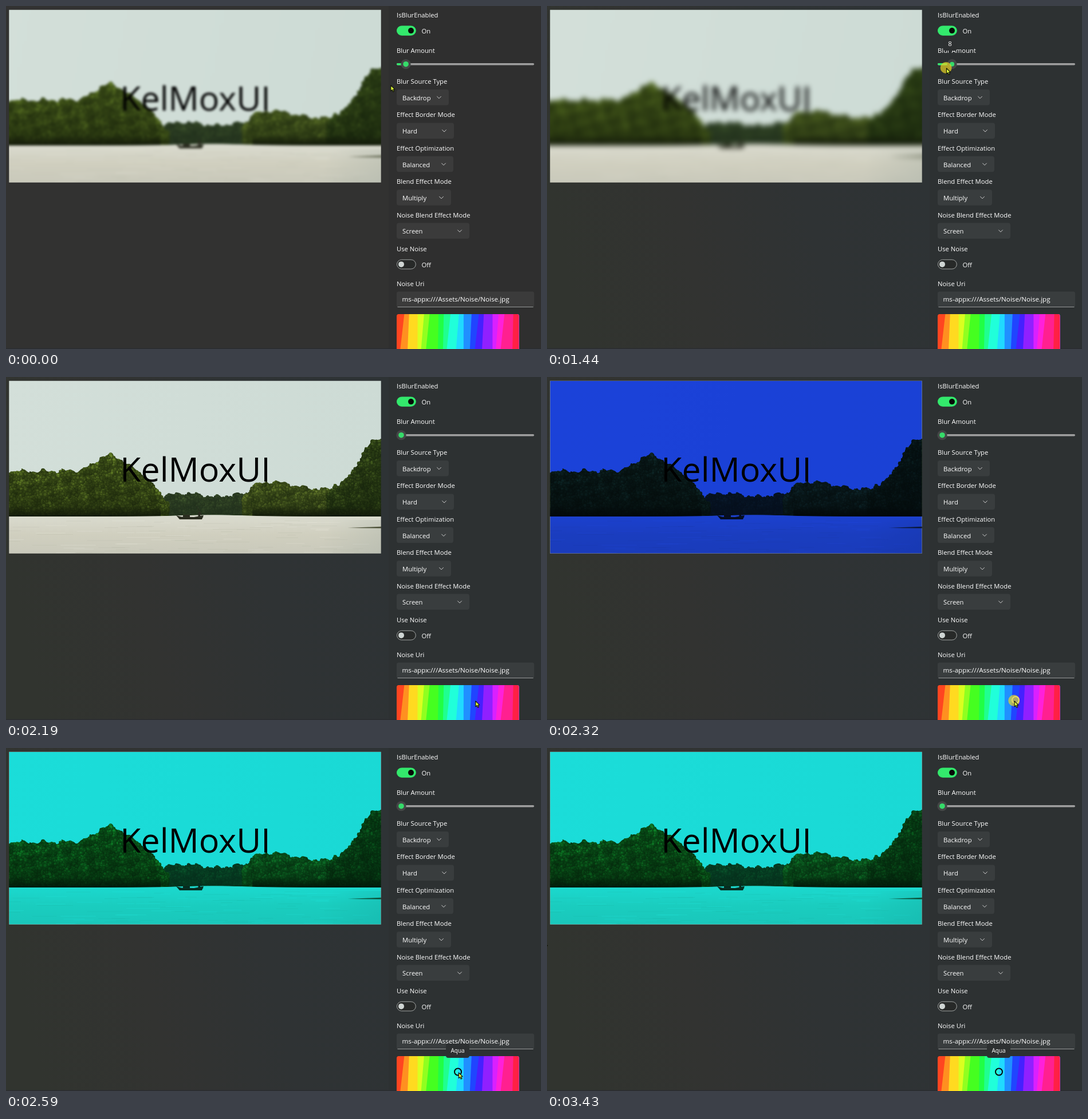
An HTML page with a canvas for the animation above (3.56 s loop, 934x600 px).

```html
<!DOCTYPE html>
<html lang="en">
<head>
<meta charset="utf-8">
<title>Blur settings</title>
<style>
html, body { margin: 0; width: 100%; height: 100%; overflow: hidden; background: #323231; }
canvas { display: block; }
</style>
</head>
<body>
<canvas id="stage" width="934" height="600"></canvas>
<script>
const ctx = document.getElementById('stage').getContext('2d');
const FONT = '"Open Sans", "Noto Sans", sans-serif';
const ACCENT = '#33e96c';
const LOOP = 3560, TICK = LOOP / 52;
const PAD = 40;
const LEFT = 682;
const PHOTO = [5.3, 6.7, 649.4, 302];
const PICKER = { x: LEFT, y: 539, w: 213.5, h: 70 };
const DRAG = { from: 885, to: 1580 };
const PICK = { from: 2320, to: 2590 };

const clamp = v => Math.max(0, Math.min(1, v));
const ramp = (t, a, b) => clamp((t - a) / (b - a));
const smooth = v => v * v * (3 - 2 * v);
const lerp = (a, b, k) => a + (b - a) * k;
const bump = (x, center, width) => Math.exp(-(((x - center) / width) ** 2));
const between = (t, a, b) => t >= a && t < b;
const snap = t => Math.floor((t + 12) / TICK) * TICK;

function randomizer(seed) {
  return () => {
    seed = (seed * 1664525 + 1013904223) >>> 0;
    return seed / 4294967296;
  };
}

function disc(x, y, r, fill, c = ctx) {
  c.fillStyle = fill;
  c.beginPath();
  c.arc(x, y, r, 0, Math.PI * 2);
  c.fill();
}

function fillRound(x, y, w, h, r, fill) {
  ctx.fillStyle = fill;
  ctx.beginPath();
  ctx.roundRect(x, y, w, h, r);
  ctx.fill();
}

function gradient(c, x0, y0, x1, y1, colors) {
  const g = c.createLinearGradient(x0, y0, x1, y1);
  colors.forEach((color, i) => g.addColorStop(i / (colors.length - 1), color));
  return g;
}

function polygon(...points) {
  const p = new Path2D();
  for (let i = 0; i < points.length; i += 2) p.lineTo(points[i], points[i + 1]);
  p.closePath();
  return p;
}

function label(str, x, y, size = 11.25, align = 'left') {
  ctx.font = `${size}px ${FONT}`;
  ctx.textAlign = align;
  ctx.fillStyle = '#fff';
  ctx.fillText(str, x, y);
}

// ---- Motion ----

function amountAt(t) {
  const p = ramp(t, DRAG.from, DRAG.to);
  return 3.6 * (1 - p) + 11.5 * Math.sin(Math.PI * p);
}

const thumbX = t => 690 + amountAt(t) * 2.24;

function glide(t, t0, t1, x0, y0, x1, y1) {
  const k = ramp(t, t0, t1);
  return [lerp(x0, x1, k), lerp(y0, y1, k)];
}

function pointer(t) {
  if (t < 330) return glide(t, 0, 130, 671, 138, 685, 124);
  if (t < DRAG.from) return glide(t, 330, 820, 685, 124, 695, 107.5);
  if (t < 1650) return [thumbX(t + 90) , 108];
  if (t < 1920) return glide(t, 1650, 1920, 690, 108, 776, 481);
  if (t < PICK.from) return glide(t, 1920, 2190, 776, 481, 819, 566);
  if (t < 2650) return glide(t, PICK.from, PICK.to, 816, 566, 789.5, 567);
  return glide(t, 2650, 3430, 789, 567, -14, 336);
}

// ---- Landscape ----

const shoreY = x => 244 - 2.5 * bump(x, 360, 80);

const GROVES = [
  { from: 258, to: 440, count: 900, dark: [32, 46, 28], light: [66, 90, 46],
    top: x => 204 + 3 * Math.sin(x / 18) },
  { from: -40, to: 283, count: 3000, dark: [27, 38, 12], light: [104, 132, 40],
    top: x => 162 - 28 * bump(x, 181, 33) + 65 * ramp(x, 225, 290) ** 1.3 },
  { from: 414, to: 620, count: 1900, dark: [31, 43, 15], light: [108, 132, 46],
    top: x => 194 - 13 * bump(x, 468, 45) + 18 * ramp(x, 430, 414) },
  { from: 562, to: 700, count: 2000, dark: [21, 34, 12], light: [76, 102, 34],
    top: x => 185 - 80 * smooth(ramp(x, 580, 650)) + 18 * ramp(x, 574, 562) }
];

function drawGrove(c, rnd, { from, to, count, dark, light, top }) {
  const shade = k => `rgb(${dark.map((d, i) => Math.round(lerp(d, light[i], k)))})`;
  const crown = x => top(x) + 2 * Math.sin(x / 6) + 1.5 * Math.sin(x / 2.7);
  c.fillStyle = shade(0.3);
  for (let x = from; x < to; x++) c.fillRect(x, crown(x) + 3, 1.5, shoreY(x) - crown(x) - 3);
  for (let i = 0; i < count; i++) {
    const x = lerp(from, to, rnd()), depth = rnd(), r = 1.3 + rnd() * 2.4;
    const y = lerp(crown(x) + r + 1, shoreY(x) - r, depth);
    const clump = 0.75 + 0.3 * Math.sin(x / 8 + y / 11) * Math.cos(y / 7 - x / 17);
    const k = clamp((1.1 - 0.7 * depth) * clump * (0.35 + 0.65 * rnd()));
    disc(x, y, r, shade(k * 0.5), c);
    disc(x - 0.5, y - 0.8, r * 0.7, shade(k), c);
  }
}

function drawBoat(c) {
  c.fillStyle = c.strokeStyle = '#2b2d20';
  c.fill(polygon(297, 242, 306, 244.5, 328, 245, 345, 242, 342, 249, 303, 249));
  c.fillRect(309, 241, 12, 4);
  c.fillRect(335.5, 236, 4, 8);
  c.lineWidth = 0.8;
  c.beginPath();
  c.moveTo(333, 226);
  c.lineTo(344, 246);
  c.stroke();
}

function makeScene() {
  const cv = document.createElement('canvas');
  cv.width = 660 + PAD * 2;
  cv.height = 310 + PAD * 2;
  const c = cv.getContext('2d');
  const rnd = randomizer(41);
  c.translate(PAD, PAD);

  c.fillStyle = gradient(c, 0, 0, 655, 120, ['#d3dfd9', '#cddbd5']);
  c.fillRect(-PAD, -PAD, cv.width, cv.height);
  GROVES.forEach(grove => drawGrove(c, rnd, grove));

  // Shade under the trees
  c.fillStyle = gradient(c, 0, 226, 0, 244, ['rgba(17,23,9,0)', 'rgba(17,23,9,.9)']);
  c.fillRect(-PAD, 226, 310, 18);
  c.fillRect(430, 226, 270, 18);

  c.fillStyle = gradient(c, 0, 242, 0, 309, ['#dadbcf', '#d0cfbf', '#c9c9bb']);
  for (let x = -PAD; x < 700; x++) c.fillRect(x, shoreY(x), 1.5, 120);
  for (let i = 0; i < 90; i++) {
    c.fillStyle = rnd() < 0.5 ? 'rgba(232,232,220,.35)' : 'rgba(174,176,158,.28)';
    c.fillRect(-20 + rnd() * 640, 250 + rnd() * 58, 15 + rnd() * 50, 0.8);
  }
  c.fillStyle = gradient(c, 560, 270, 670, 320, ['rgba(165,175,165,0)', 'rgba(165,175,165,.45)']);
  c.fillRect(500, 250, 200, 100);
  c.fillStyle = '#4c5138';
  c.fill(polygon(596, 264, 700, 260, 700, 265));
  drawBoat(c);

  c.fillStyle = '#000';
  c.font = `59px ${FONT}`;
  c.textAlign = 'center';
  c.fillText('KelMoxUI', 330.5, 183);
  return cv;
}

const scene = makeScene();

function drawPhoto(amount, hue) {
  ctx.save();
  ctx.beginPath();
  ctx.rect(...PHOTO);
  ctx.clip();
  if (amount > 0.05) ctx.filter = `blur(${(amount * 0.6).toFixed(2)}px)`;
  ctx.drawImage(scene, -PAD, -PAD);
  ctx.filter = 'none';
  if (hue !== null) {
    ctx.globalCompositeOperation = 'multiply';
    ctx.fillStyle = `hsl(${hue}, 100%, 56.3%)`;
    ctx.fillRect(...PHOTO);
  }
  ctx.restore();
}

// ---- Settings panel ----

function drawBackground(tint) {
  ctx.fillStyle = '#323231';
  ctx.fillRect(0, 0, 934, 600);
  ctx.fillStyle = '#2f2f2f';
  ctx.fillRect(668, 0, 266, 600);
  ctx.globalAlpha = tint;
  ctx.fillStyle = gradient(ctx, 0, 330, 640, 180, ['#31342f', '#323331', '#2f3334', '#2e3335']);
  ctx.fillRect(0, 0, 668, 600);
  ctx.fillStyle = '#2d3132';
  ctx.fillRect(668, 0, 266, 600);
  ctx.globalAlpha = 1;
  ctx.fillStyle = '#2b2d31';
  ctx.fillRect(0, 598.5, 934, 1.5);
}

function combo([title, value, w], i) {
  const y = 136 + i * 58.4;
  label(title, LEFT, y);
  fillRound(LEFT, y + 10, w, 27.5, 4, 'rgba(255,255,255,.06)');
  label(value, LEFT + 10, y + 28.7);
  const cx = LEFT + w - 17, cy = y + 22;
  ctx.strokeStyle = '#cfcfcf';
  ctx.lineWidth = 1;
  ctx.beginPath();
  ctx.moveTo(cx - 3.7, cy);
  ctx.lineTo(cx, cy + 3.7);
  ctx.lineTo(cx + 3.7, cy);
  ctx.stroke();
}

function toggle(title, y, on) {
  label(title, LEFT, y);
  fillRound(LEFT + 0.5, y + 15, 32.8, 16.2, 8.1, on ? ACCENT : '#272928');
  ctx.strokeStyle = on ? ACCENT : '#a2a5a4';
  ctx.lineWidth = 1;
  ctx.stroke();
  disc(on ? 707 : 690, y + 23.1, 5, on ? '#080a08' : '#cfd5d3');
  label(on ? 'On' : 'Off', 725.5, y + 28);
}

function drawSlider(x, dot) {
  label('Blur Amount', LEFT, 82);
  fillRound(LEFT, 100, 240, 3.4, 1.7, '#9f9f9f');
  fillRound(LEFT, 100, x - LEFT, 3.4, 1.7, ACCENT);
  disc(x, 101.7, 8.6, '#454747');
  disc(x, 101.7, dot, '#36db6a');
}

function drawPicker() {
  const { x, y, w, h } = PICKER, n = 18;
  const top = i => x + w * i / n + 2 * Math.sin(i * 2.3);
  const bottom = i => top(i) - 4 - 4 * Math.sin(i * 1.7);
  ctx.save();
  ctx.beginPath();
  ctx.roundRect(x, y, w, h, 3.5);
  ctx.clip();
  for (let i = 0; i < n; i++) {
    ctx.fillStyle = `hsl(${(i + 0.5) * 360 / n}, 100%, 56.3%)`;
    ctx.fill(polygon(top(i), y, x + w, y, x + w, y + h, bottom(i), y + h));
  }
  ctx.restore();
}

function drawPanel(x, dot) {
  toggle('IsBlurEnabled', 20, true);
  drawSlider(x, dot);
  [
    ['Blur Source Type', 'Backdrop', 91],
    ['Effect Border Mode', 'Hard', 100],
    ['Effect Optimization', 'Balanced', 99],
    ['Blend Effect Mode', 'Multiply', 95],
    ['Noise Blend Effect Mode', 'Screen', 127]
  ].forEach(combo);
  toggle('Use Noise', 428.8, false);

  label('Noise Uri', LEFT, 490);
  fillRound(LEFT, 499.5, 240, 27.5, 3.5, 'rgba(255,255,255,.06)');
  ctx.fillStyle = '#979a99';
  ctx.fillRect(LEFT + 1.5, 526, 237, 1);
  label('ms-appx:///Assets/Noise/Noise.jpg', 691.5, 516.6, 11.65);
  drawPicker();
}

function drawTip(str, cx, y, w, size) {
  const h = 25;
  fillRound(cx - w / 2, y, w, h, 4, '#2d3031');
  label(str, cx, y + h / 2 + size * 0.36, size, 'center');
}

function drawPick(t) {
  const k = ramp(t, PICK.from + 10, PICK.to);
  const x = lerp(818, 789, k), y = lerp(565, 566.5, k);
  const bright = x < 803;
  ctx.strokeStyle = bright ? '#050808' : '#f2f4f4';
  ctx.lineWidth = 2;
  ctx.beginPath();
  ctx.arc(x, y, 6, 0, Math.PI * 2);
  ctx.stroke();
  ctx.globalAlpha = ramp(t, PICK.from, PICK.from + 140);
  drawTip(bright ? 'Aqua' : 'Blue', x - 0.5, 517, 41, 10);
  ctx.globalAlpha = 1;
}

function drawPointer(x, y, pressed) {
  if (pressed) disc(x, y, 10, 'rgba(232,212,36,.7)');
  ctx.save();
  ctx.translate(x + 0.8, y + 0.8);
  const arrow = polygon(0, 0, 0, 9.8, 2.3, 7.8, 3.9, 11.3, 5.7, 10.5, 4.1, 7.2, 7, 7);
  ctx.fillStyle = '#dcf83c';
  ctx.strokeStyle = '#0c0f04';
  ctx.lineWidth = 1.1;
  ctx.lineJoin = 'round';
  ctx.fill(arrow);
  ctx.stroke(arrow);
  ctx.restore();
}

function draw(t) {
  const amount = amountAt(t), x = thumbX(t);
  const picked = t >= PICK.from;
  const hue = picked ? lerp(230, 180.5, ramp(t, PICK.from, PICK.to)) : null;
  const dragging = between(t, DRAG.from, DRAG.to);
  const dot = dragging ? 4 : between(t, 600, DRAG.from) ? 6 : 4.8;

  drawBackground(ramp(t, DRAG.from, 1160));
  drawPhoto(amount, hue);
  drawPanel(x, dot);
  if (between(t, 950, DRAG.to)) drawTip(String(Math.round(amount)), x - 3.5, 53, 24, 11.5);
  if (picked) drawPick(t);
  drawPointer(...pointer(t), dragging || between(t, PICK.from, 2520));
}

const start = performance.now();
function loop() {
  draw(snap((performance.now() - start) % LOOP));
  requestAnimationFrame(loop);
}
loop();
</script>
</body>
</html>
```
